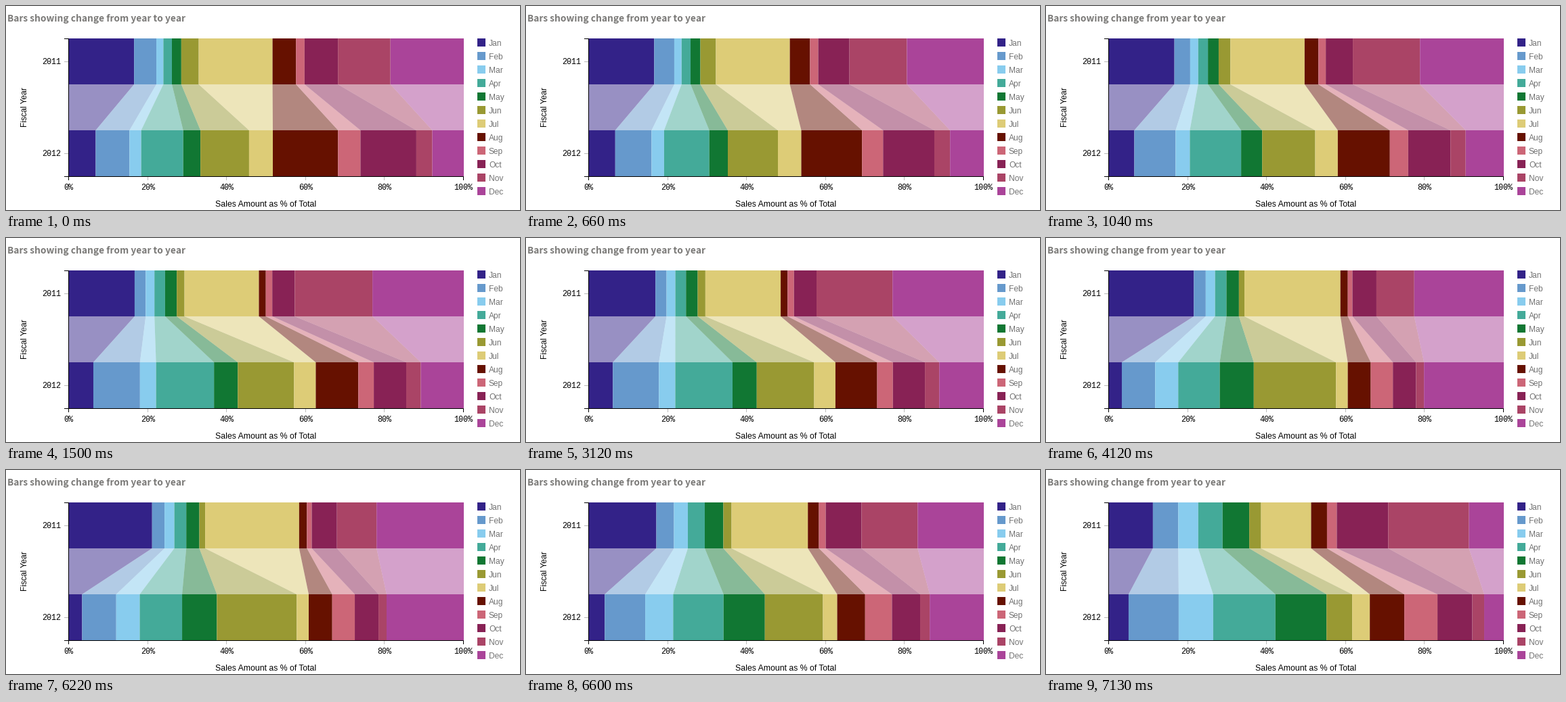
A matplotlib script that plays this animation: 759x302 px, repeating every 8 s.

```python
import numpy as np
import matplotlib.pyplot as plt
from matplotlib.animation import FuncAnimation
from matplotlib.collections import PolyCollection
from matplotlib.patches import Rectangle

W, H, DPI = 759, 302, 64
PT = 72 / DPI  # points per pixel
LOOP, TICK = 8000, 20

LEFT, RIGHT = 92, 676
TOP, MID_TOP, MID_BOTTOM, BOTTOM = 48, 116, 184, 252

MONTHS = "Jan Feb Mar Apr May Jun Jul Aug Sep Oct Nov Dec".split()
COLORS = ("#332288 #6699cc #88ccee #44aa99 #117733 #999933 "
          "#ddcc77 #661100 #cc6677 #882255 #aa4466 #aa4499").split()

# Monthly sales for 2011 and 2012, and how each selection boosts some months
SALES = ([66, 37.5, 29.5, 36, 39.5, 17.5, 74, 23.5, 14.5, 76, 119.5, 51.5],
         [30, 74, 51, 92, 75.5, 38, 26, 51, 49, 51.5, 17.5, 29])
SELECTIONS = [
    ({4.2: "Jan Jun Jul Aug", 2.5: "Feb Sep", 1.85: "Oct Nov", 6: "Dec"},
     {4: "Jan Jul Nov", 2: "Feb Apr Sep", 4.75: "Oct Dec", 5.6: "Jun Aug"}),
    ({3.4: "Jan Jul", 1.5: "Jun Sep", 2.2: "Nov", 6: "Dec"},
     {2: "Feb Apr Oct", 2.65: "Jan Jul Aug Nov", 4.7: "Jun Dec"}),
    ({4.1: "Jan Jul", 5.5: "Dec"}, {4.8: "Jun", 6.1: "Dec"}),
    ({}, {}),
]

# Transitions in visible steps: (first step ms, last step ms, steps)
MOVES = [(500, 1500, 14), (3120, 4120, 14), (6220, 7130, 13)]


def boundaries(sales, boosts):
    """Edges of the stacked months, scaled to 100 % of the row."""
    sales = np.array(sales, float)
    for factor, names in boosts.items():
        for name in names.split():
            sales[MONTHS.index(name)] *= factor
    share = np.concatenate(([0], np.cumsum(sales))) / sales.sum()
    return LEFT + (RIGHT - LEFT) * share


STATES = [np.array([boundaries(s, b) for s, b in zip(SALES, pair)])
          for pair in SELECTIONS]


def edges_at(t):
    rows = STATES[0]
    for old, new, (start, end, steps) in zip(STATES, STATES[1:], MOVES):
        if t >= start:
            k = int((t - start) * (steps - 1) / (end - start))
            p = 1 if k >= steps - 1 else 0.043 + k / 13
            rows = old + p * (new - old)
    return rows


def strips(upper, lower, y0, y1):
    return [[(upper[i], y0), (upper[i + 1], y0), (lower[i + 1], y1), (lower[i], y1)]
            for i in range(len(MONTHS))]


def shapes(t):
    a, b = edges_at(t)
    return (strips(a, a, TOP, MID_TOP) + strips(a, b, MID_TOP, MID_BOTTOM)
            + strips(b, b, MID_BOTTOM, BOTTOM))


fig = plt.figure(figsize=(W / DPI, H / DPI), dpi=DPI, facecolor="white")
ax = fig.add_axes([0, 0, 1, 1])
ax.set_xlim(0, W)
ax.set_ylim(H, 0)
ax.axis("off")


def label(x, y, s, size=12, color="black", font="Liberation Sans", **kw):
    ax.text(x, y, s, fontsize=size * PT, color=color, family=font,
            va="baseline", **kw)


def line(points, color):
    x, y = np.array(points).T + 0.5
    ax.plot(x, y, color=color, lw=PT, solid_capstyle="projecting",
            solid_joinstyle="miter", snap=False, zorder=3)


tints = [(c, alpha) for alpha in (1, 0.5, 1) for c in COLORS]
bars = PolyCollection(shapes(0), facecolors=tints, edgecolors="none", linewidths=0)
bars.set_snap(False)
ax.add_collection(bars, autolim=False)

label(2, 23, "Bars showing change from year to year", 13.7, "#7b7a78",
      ["Noto Sans CJK JP", "Liberation Sans"], weight="bold")

for y, year in ((82, "2011"), (218, "2012")):
    line([(86, y), (LEFT - 1, y)], "#bbbbbb")
    label(81, y + 4, year, 11.7, font="Liberation Mono", ha="right")
for pct in range(0, 101, 20):
    x = round(LEFT + (RIGHT - 1 - LEFT) * pct / 100)
    line([(x, BOTTOM + 1), (x, 257)], "#bbbbbb")
    label(x + 0.5, 272, f"{pct}%", 11.7, font="Liberation Mono", ha="center")

line([(86, TOP), (LEFT, TOP), (LEFT, BOTTOM), (86, BOTTOM)], "black")
line([(LEFT, 257), (LEFT, BOTTOM), (RIGHT - 1, BOTTOM), (RIGHT - 1, 257)], "black")
label(383.5, 297, "Sales Amount as % of Total", 12.2, ha="center")
label(31, 150, "Fiscal Year", ha="center", rotation=90, rotation_mode="anchor")

for i, (month, color) in enumerate(zip(MONTHS, COLORS)):
    y = 48 + 20 * i
    ax.add_patch(Rectangle((696, y), 12, 12, fc=color, ec="none", lw=0))
    label(713, y + 11, month, color="#737373")


def draw(n):
    bars.set_verts(shapes((n + 0.5) * TICK))
    return [bars]


anim = FuncAnimation(fig, draw, frames=LOOP // TICK, interval=TICK,
                     repeat=True, repeat_delay=0, blit=False)
plt.show()
```
